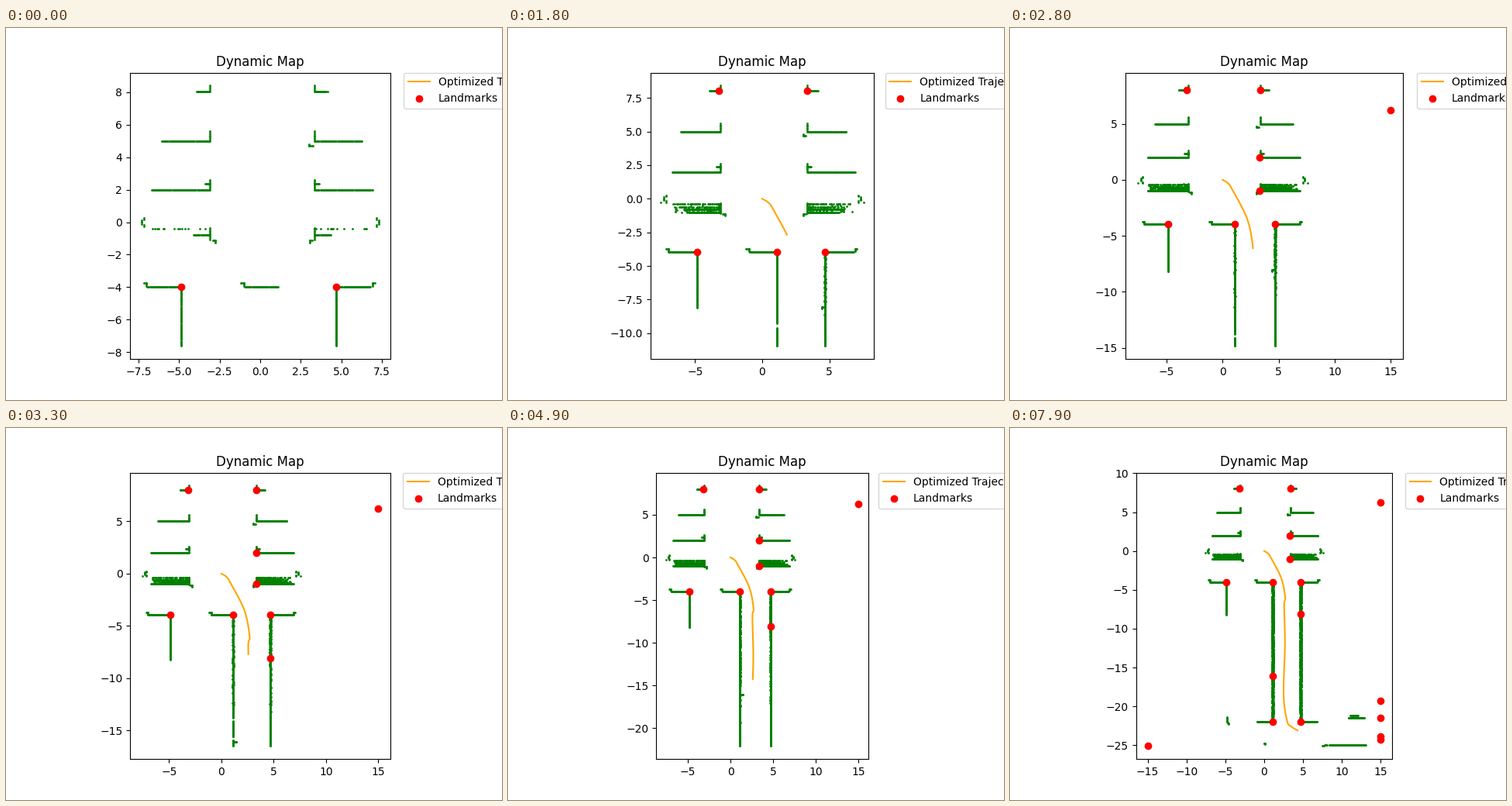
Write a matplotlib script that moves like this. It is 640 px wide and 480 px high and loops after 8000 ms.

```python
import numpy as np
import matplotlib.pyplot as plt
from matplotlib.animation import FuncAnimation

FRAMES, STEP = 80, 100
LEFT_WALL, RIGHT_WALL, FAR_END = 1.1, 4.69, -22.1
rng = np.random.default_rng(4)


def spline(knots, n=12):
    """Smooth curve through the knots (Catmull-Rom)."""
    k = np.array(knots, float)
    p = np.vstack([2 * k[0] - k[1], k, 2 * k[-1] - k[-2]])
    u = np.linspace(0, 1, n, endpoint=False)[:, None]
    runs = []
    for a, b, c, d in zip(p, p[1:], p[2:], p[3:]):
        runs.append(b + .5 * u * (c - a + u * (2 * a - 5 * b + 4 * c - d
                                               + u * (3 * (b - c) + d - a))))
    return np.vstack(runs + [k[-1:]])


# Driven path, and how far down it the robot is (time, -y)
PATH = spline([(0, 0), (.45, -.28), (.85, -.85), (2.2, -3.5), (2.7, -6), (2.57, -7),
               (2.67, -12), (2.5, -18.5), (2.95, -21.9), (3.5, -22.6), (4.3, -23.1)])
HEAD = np.array([(.2, 0), (1.3, .85), (2.3, 4.5), (3.3, 7.7), (6.2, 19.6), (7.9, 23.1)]).T
# How far down the corridor has been scanned (time, -y)
FRONT = np.array([(0, 7.65), (1.2, 8.25), (2.3, 13.15), (3.7, 17.8), (4.6, -FAR_END)]).T

# Corners recognised at each time
FOUND = [
    (0, [(-4.86, -3.97), (RIGHT_WALL, -3.97)]),
    (.8, [(-3.2, 8.03), (3.36, 8.03)]),
    (1.7, [(LEFT_WALL, -3.97)]),
    (2.0, [(3.33, 2)]),
    (2.6, [(3.33, -1), (15, 6.23)]),
    (2.9, [(RIGHT_WALL, -8.08)]),
    (5.0, [(LEFT_WALL, -16.05)]),
    (6.4, [(LEFT_WALL, -22), (RIGHT_WALL, -22)]),
    (6.8, [(-15, -25.1)]),
    (7.1, [(14.95, -19.3), (14.95, -21.5)]),
    (7.5, [(14.95, -23.85), (14.95, -24.3)]),
]
LANDMARKS = np.array([(x, y, t) for t, spots in FOUND for x, y in spots])

parts = []


def dots(x, y, birth=0):
    parts.append(np.column_stack(np.broadcast_arrays(x, y, birth)).astype(float))


def seg(x0, y0, x1, y1, t0=0, t1=None, gap=.05):
    """Straight edge, revealed from its first end to its second."""
    n = int(np.hypot(x1 - x0, y1 - y0) / gap) + 2
    dots(np.linspace(x0, x1, n), np.linspace(y0, y1, n),
         np.linspace(t0, t0 if t1 is None else t1, n))


def hook(x, y, dx, dy, t=0):
    seg(x, y, x + dx, y, t, gap=.08)
    seg(x + dx, y, x + dx, y + dy, t, gap=.08)


def corridor(x, seen, patchy):
    """Long wall that follows the scan front; skipped patches fill in later."""
    d = np.linspace(4, -FAR_END, 420)
    birth = np.maximum(np.interp(d, FRONT[1], FRONT[0]) - .01, seen)
    skipped = rng.random(80) < patchy
    late = birth + skipped[(d / .3).astype(int)] * .9
    dots(x, -d, late)
    dots(x + rng.choice([-.06, .06], d.size), -d, late + rng.uniform(.8, 5, d.size))


def band(side, near, far):
    """Cluttered shelf, dense at its lower edge."""
    span = far - near
    seg(side * near, -.8, side * (near + 1), -.8)
    seg(side * (near + 1), -.8, side * (far - .9), -.8, .4, 1.1)
    seg(side * near, -1, side * far, -1, 1.4, 2.0)
    seg(side * near, -.35, side * near, -1.05, gap=.1)
    dots(side * (near + span * rng.random(14)), -.4)
    n = 60
    dots(side * (near + span * rng.beta(1, 1.4, n)), rng.choice([-.4, -.6], n),
         rng.uniform(.4, 1.8, n))
    n = 130
    y = -1 + .65 * rng.beta(.9, 1.7, n)
    dots(side * (near + span * rng.beta(1, 1.4, n)), y, rng.uniform(1.3, 2.8, n))


# Both sides of the hall
for side, near in ((-1, 3.1), (1, 3.35)):
    for y, far in ((8.03, 4.03), (5, 6.15), (2, 6.8)):
        seg(side * near, y, side * (far + .1 * side), y)
        seg(side * near, y + .1, side * near, min(y + .6, 8.41), gap=.1)
    seg(side * near, 2.36, side * (near + .28), 2.36)
    band(side, near, 6.8 + .1 * side)
    hook(3.07 + .13 * side if side > 0 else -2.93, -1.12, -.15 * side, -.15)
    y = np.linspace(-.25, .25, 8)
    dots(side * np.where(abs(y) < .12, 7.31, 7.15), y)
    dots(side * 7.57, -.25, .6)
hook(3.25, 4.7, -.22, .1)

# Cross wall
seg(-6.95, -3.97, -4.86, -3.97)
seg(-.95, -3.97, LEFT_WALL, -3.97)
seg(RIGHT_WALL, -3.97, 6.8, -3.97)
for x, dx in ((-7.14, .14), (-1.2, .22), (7.05, -.14)):
    hook(x, -3.72, dx, -.2)

# Verticals
seg(-4.86, -4, -4.86, -7.6)
seg(-4.86, -7.6, -4.86, -8.2, .4, 2.0)
corridor(LEFT_WALL, 1.6, .15)
corridor(RIGHT_WALL, 0, 0)
hook(4.65, -8.03, -.22, -.15, .9)
dots([4.62, RIGHT_WALL], [-8.65, -8.93], 1.1)
hook(1.3, -16.05, .1, -.05, 3.2)

# Far end
hook(4.6, -22.08, -.2, -.05, 5.2)
hook(-.02, -24.78, .1, -.08, 5.8)
seg(LEFT_WALL, -22, -.9, -22, 6.4, 6.9)
seg(RIGHT_WALL, -22, 6.8, -22, 6.3, 6.9)
seg(-4.82, -21.4, -4.82, -22, 6.8, gap=.12)
seg(-4.75, -22, -4.55, -22.25, 7.0, gap=.1)
seg(10.85, -21.5, 12.9, -21.5, 7.0, 7.6)
seg(11.1, -21.15, 12.1, -21.15, 7.1, 7.5, gap=.09)
seg(8.4, -25, 13.05, -25, 7.0, 7.7)
seg(7.5, -25.05, 8.1, -24.95, 7.3, gap=.1)

POINTS = np.vstack(parts)

fig, ax = plt.subplots(figsize=(6.4, 4.8), dpi=100)


def visible(data, t):
    return data[data[:, 2] <= t + 1e-6].T


def draw(i):
    t = i * STEP / 1000
    ax.cla()
    x, y, _ = visible(POINTS, t)
    ax.scatter(x, y, s=1, c="green")
    tip = -np.interp(t, *HEAD)
    y = np.append(PATH[PATH[:, 1] > tip, 1], tip)
    ax.plot(np.interp(-y, -PATH[:, 1], PATH[:, 0]), y, color="orange",
            label="Optimized Trajectory")
    x, y, _ = visible(LANDMARKS, t)
    ax.scatter(x, y, c="red", label="Landmarks")
    ax.set_title("Dynamic Map")
    ax.set_aspect("equal", adjustable="box")
    ax.legend(bbox_to_anchor=(1.05, 1), loc="upper left", borderaxespad=0)
    return []


anim = FuncAnimation(fig, draw, frames=FRAMES, interval=STEP,
                     init_func=lambda: [], repeat=True, repeat_delay=0)
plt.show()
```
